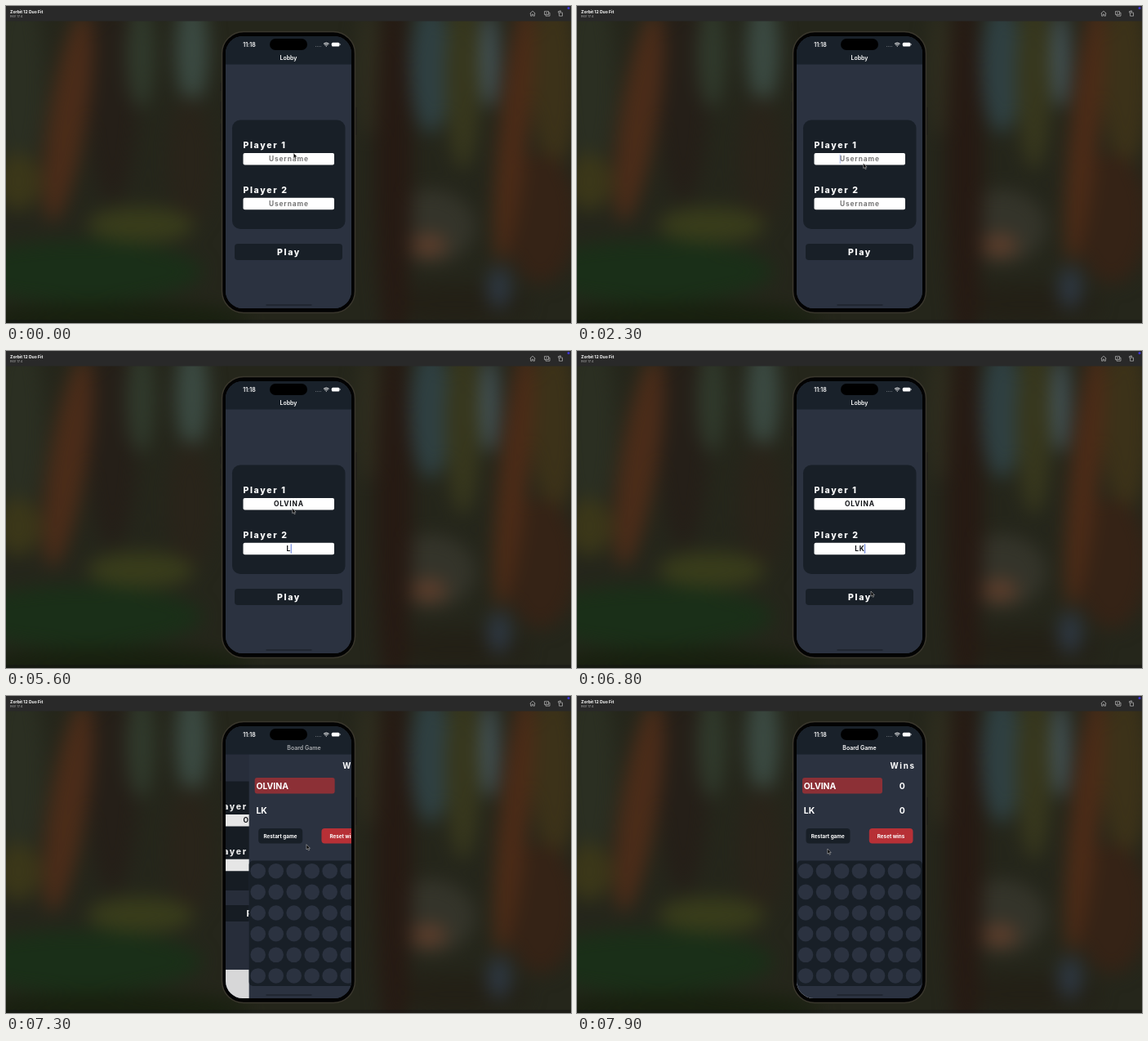
Recreate the animation shown at these times as an HTML page. Size 692 px wide and 388 px high, loop 8 s.

```html
<!DOCTYPE html>
<html lang="en">
<head>
<meta charset="utf-8">
<title>Lobby</title>
<style>
html, body { margin: 0; width: 100%; height: 100%; overflow: hidden; background: #25261b; }
svg { display: block; width: 100vw; height: 100vh; }
text { font-family: Inter, Roboto, sans-serif; font-weight: 600; fill: #fff; white-space: pre; }
.mid { text-anchor: middle; }
.label { font-size: 10.5px; font-weight: 800; letter-spacing: 1.65px; }
.field { font-size: 8.4px; font-weight: 700; letter-spacing: .85px; text-anchor: middle; }
.big { font-size: 10.4px; font-weight: 700; }
.wins { font-size: 9.8px; font-weight: 700; letter-spacing: 1.7px; }
.bar { font-size: 7px; text-anchor: middle; }
.btn { font-size: 6.3px; font-weight: 700; text-anchor: middle; }
.icon { fill: none; stroke: #b9b9b9; stroke-width: .7; }
</style>
</head>
<body>
<svg viewBox="0 0 692 388" preserveAspectRatio="none">
  <defs>
    <filter id="blur" filterUnits="userSpaceOnUse" x="-60" y="-60" width="812" height="508" color-interpolation-filters="sRGB">
      <feGaussianBlur stdDeviation="11"/>
    </filter>
    <clipPath id="screen"><rect x="269" y="37" width="154" height="333" rx="21"/></clipPath>
    <clipPath id="body"><rect x="269" y="71" width="154" height="299"/></clipPath>
  </defs>

  <rect width="692" height="388" fill="#25261b"/>
  <g id="forest" filter="url(#blur)"></g>
  <rect y="384" width="692" height="4" fill="#121214" opacity=".35"/>

  <rect width="692" height="18.5" fill="#292929"/>
  <text x="5" y="8.8" font-size="5.1" style="font-weight:700">Zorbit 12 Duo Fit</text>
  <text x="5" y="14" font-size="4" style="font-weight:400;fill:#a4a4a4">Rev 17.4</text>
  <path class="icon" d="M641.7 9.2L645 6.2l3.3 3M642.6 8.6v3.6h1.6v-2h1.6v2h1.6V8.6"/>
  <path class="icon" d="M659.5 6.5h5v4h-5zM661 10.5v1.7h5v-4h-1.5M661 8.5h2"/>
  <path class="icon" d="M677.5 8.2h4v4h-4zM676.5 8.5V6.5h3M678.5 5.2l1.2 1.3-1.2 1.3"/>
  <circle cx="689" cy="2.5" r="1.5" fill="#3f35d8"/>

  <path d="M263.5 94v10M263.5 117v21M263.5 144v21M428.5 124v34" stroke="#211f1b" stroke-width="2"/>
  <rect x="264.5" y="31.5" width="163" height="344" rx="26.5" fill="#030303" stroke="#3a372d" stroke-width="1.5"/>

  <g clip-path="url(#screen)">
    <rect x="269" y="37" width="154" height="333" fill="#2b3240"/>
    <g clip-path="url(#body)">
      <g id="lobby">
        <rect x="269" y="30" width="154" height="380" fill="#2b3240"/>
        <g id="form">
          <rect x="277" y="139.5" width="138.5" height="133.5" rx="10" fill="#181f27"/>
          <text class="label" x="290.5" y="174">Player 1</text>
          <text class="label" x="290.5" y="228.8">Player 2</text>
          <rect x="290.5" y="180" width="111.5" height="14.5" rx="2" fill="#fff"/>
          <rect x="290.5" y="234.8" width="111.5" height="14.5" rx="2" fill="#fff"/>
          <text class="field" id="in1" x="346.4" y="190.4"></text>
          <text class="field" id="in2" x="346.4" y="245.2"></text>
          <rect id="caret" width="1" height="11.5" fill="#5873d6"/>
          <g id="play">
            <rect x="280" y="291" width="132" height="20" rx="4" fill="#181f27"/>
            <text class="label mid" x="346.5" y="304.8">Play</text>
          </g>
        </g>
        <rect id="keys" x="269" width="154" height="40" fill="#eeeeef"/>
        <rect id="dim" x="269" y="30" width="154" height="380"/>
      </g>
      <g id="game">
        <rect x="269" y="71" width="154" height="300" fill="#2b3240"/>
        <text class="wins" x="383.5" y="89.3">Wins</text>
        <rect x="276" y="100" width="98" height="19.5" rx="3" fill="#8c3036"/>
        <text class="big" x="277.8" y="113.6">OLVINA</text>
        <text class="big" x="277.8" y="144.4">LK</text>
        <text class="big mid" x="398.3" y="113.6">0</text>
        <text class="big mid" x="398.3" y="144.4">0</text>
        <rect x="280.5" y="162" width="54" height="18.5" rx="4" fill="#181f27"/>
        <text class="btn" x="307.3" y="173.5">Restart game</text>
        <rect x="357.8" y="162" width="53.7" height="18.5" rx="4" fill="#b73036"/>
        <text class="btn" x="384.5" y="173.5">Reset wins</text>
        <rect x="269" y="201.5" width="154" height="153.5" rx="5" fill="#181f27"/>
        <g id="holes" fill="#2b3240"></g>
      </g>
    </g>
    <rect x="269" y="37" width="154" height="34.5" fill="#19212a"/>
    <text class="bar" id="title1" x="346" y="66">Lobby</text>
    <text class="bar" id="title2" x="346" y="66">Board Game</text>
    <text class="bar" x="298" y="49.5">11:18</text>
    <rect x="323" y="40" width="46" height="14" rx="7"/>
    <path d="M379 49.5h7" stroke="#5d646b" stroke-dasharray="1 1"/>
    <g fill="none" stroke="#fff" stroke-width="1">
      <path d="M389 46.3q3.3-2.6 6.6 0M390.3 47.7q2-1.5 4 0"/>
      <path d="M391.7 49.1h1.2"/>
    </g>
    <rect x="398.8" y="44.7" width="9.7" height="4.8" rx="1.5" fill="#fff"/>
    <path d="M409.5 46.3v1.6" stroke="#a0a5aa" stroke-width=".8"/>
    <path d="M319 366h55" stroke="#1d232d" stroke-width="1.5" stroke-linecap="round"/>
  </g>

  <path id="pointer" d="M0 0v6.2l1.4-1.2 1.1 2.3 1-.5-1-2.200h1.900z" fill="#050505" stroke="#d5d5d5" stroke-width=".5"/>
</svg>

<script>
const LOOP = 8000, STEP = 100;
const el = id => document.getElementById(id);
const set = (id, attrs) => {
  for (const k in attrs) el(id).setAttribute(k, attrs[k]);
};
const clamp = v => Math.max(0, Math.min(1, v));

// Soft forest shapes: cx, cy, rx, ry, colour, tilt in degrees
const forest = [
  [15, 90, 32, 120, '#2b2f22'], [15, 215, 28, 35, '#3b3719'],
  [130, 110, 30, 130, '#251f18'], [165, 60, 17, 65, '#303a2c'],
  [228, 55, 20, 65, '#3b4a42'], [225, 190, 28, 80, '#29241a'],
  [165, 268, 65, 22, '#383c1b'], [90, 325, 150, 38, '#1a2f18'],
  [130, 385, 170, 22, '#18200f'], [76, 135, 23, 130, '#4b2c19', 9],
  [444, 80, 14, 80, '#2f2e1f'], [520, 75, 25, 80, '#2f4042'],
  [560, 90, 22, 110, '#37371d'], [592, 65, 11, 60, '#435358'],
  [520, 270, 55, 45, '#34342a'], [518, 293, 22, 14, '#5c3d2b'],
  [672, 90, 28, 110, '#3c3219'], [655, 260, 45, 80, '#352316'],
  [550, 365, 90, 25, '#232016'], [604, 345, 14, 26, '#2e3843'],
  [622, 150, 18, 165, '#4c2b17', 6], [475, 200, 23, 230, '#261a13']
];
el('forest').innerHTML = forest.map(([x, y, rx, ry, c, tilt = 0]) =>
  `<ellipse cx="${x}" cy="${y}" rx="${rx}" ry="${ry}" fill="${c}" transform="rotate(${tilt} ${x} ${y})"/>`).join('');

let holes = '';
for (let r = 0; r < 6; r++)
  for (let c = 0; c < 7; c++)
    holes += `<circle cx="${280 + c * 22}" cy="${214.2 + r * 25.65}" r="9.3"/>`;
el('holes').innerHTML = holes;

// Pointer path: time, x, y
const path = [
  [900, 352.2, 180], [1400, 350.7, 192.5], [6200, 350.7, 192.5],
  [6400, 374, 198], [6500, 374, 198], [6800, 360, 294], [7000, 360, 294],
  [7300, 368, 181.7], [7800, 389, 168.5], [7900, 306.8, 187]
];
function pointerAt(t) {
  const i = path.findIndex(p => p[0] > t);
  if (i < 0) return path[path.length - 1].slice(1);
  if (!i) return path[0].slice(1);
  const a = path[i - 1], b = path[i], k = (t - a[0]) / (b[0] - a[0]);
  return [a[1] + (b[1] - a[1]) * k, a[2] + (b[2] - a[2]) * k];
}

// Caret opacity steps and the times at which letters are typed
const blink = [
  [0, 0], [1400, 1], [1900, .5], [2000, 0], [2300, .5], [2400, 1],
  [2900, .5], [3000, 1], [4800, .5], [4900, 0], [5200, .5], [5300, 1],
  [6300, .5], [6400, 0], [6600, .5], [6700, 1], [7100, 0]
];
const name1 = 'OLVINA', keys1 = [3000, 3300, 3600, 3700, 3800, 4000];
const name2 = 'LK', keys2 = [5600, 6000];

// Shows the letters typed so far and returns the caret's x
function type(id, name, times, t) {
  const typed = name.slice(0, times.filter(k => k <= t).length);
  const box = el(id);
  box.textContent = typed || 'Username';
  box.style.fill = typed ? '#101216' : '#777';
  const half = box.getComputedTextLength() / 2;
  return 346.4 + (typed ? half - .5 : -half - .3);
}

function draw(t) {
  const end1 = type('in1', name1, keys1, t), end2 = type('in2', name2, keys2, t);
  const second = t >= 4300;
  set('caret', {
    x: second ? end2 : end1,
    y: second ? 236.3 : 181.5,
    opacity: blink.filter(b => b[0] <= t).pop()[1]
  });

  // Critically damped page push
  const s = Math.max(0, (t - 7000) / 1000), w = 10.3 * s;
  const p = s >= .8 ? 1 : 1 - (1 + w) * Math.exp(-w);
  const lift = 35 * clamp(s / .3);
  set('lobby', { transform: `translate(${-46 * p})` });
  set('form', { transform: `translate(0 ${-lift})` });
  set('keys', { y: 370 - lift });
  set('dim', { opacity: .12 * p });
  set('play', { opacity: t >= 7000 ? .6 + .4 * clamp(s / .2) : 1 });
  set('game', { transform: `translate(${154 * (1 - p)})` });
  set('title1', { transform: `translate(${-77 * p})`, opacity: clamp(1 - 1.5 * p) });
  set('title2', { transform: `translate(${102 * (1 - p)})`, opacity: clamp((p - .5) * 2) });
  set('pointer', { transform: `translate(${pointerAt(t)})` });
}

const start = performance.now();
function tick() {
  const t = (performance.now() - start) % LOOP;
  draw(Math.floor(t / STEP) * STEP);
  requestAnimationFrame(tick);
}
tick();
</script>
</body>
</html>
```
